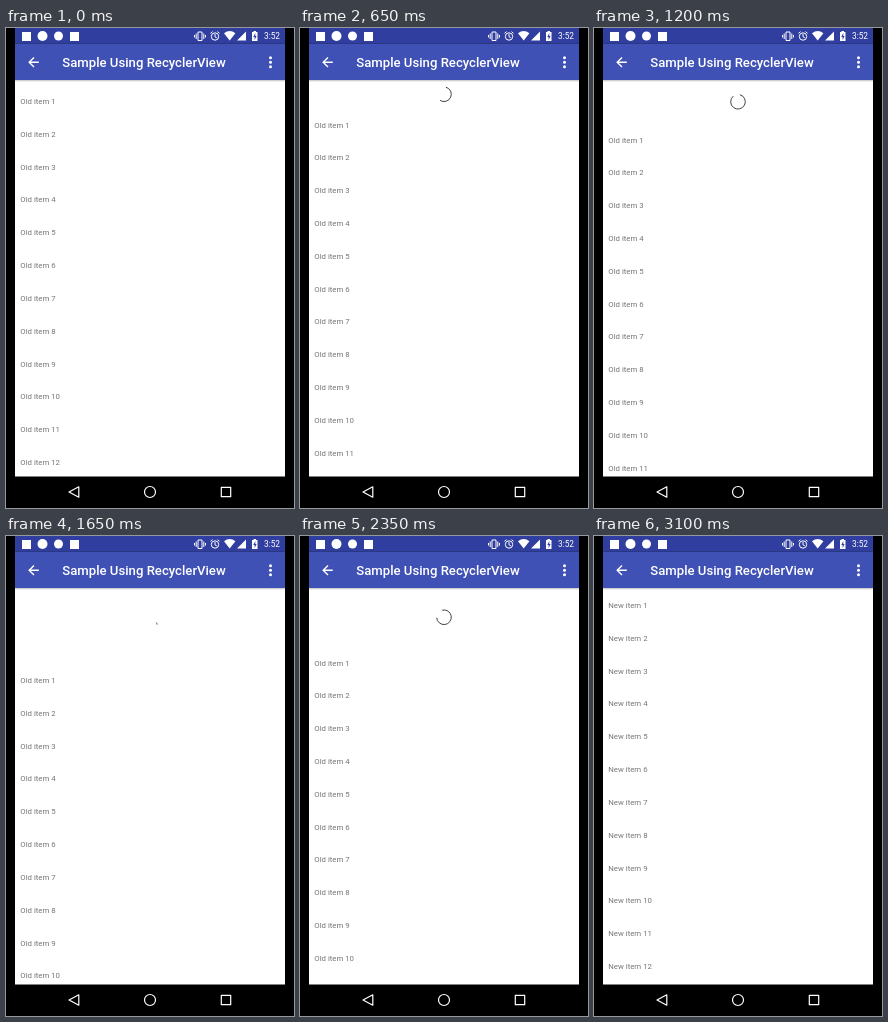
Write an HTML page that moves like this. It is 288 px wide and 480 px high and loops after 3.25 s.

```html
<!DOCTYPE html>
<html lang="en">
<head>
<meta charset="utf-8">
<title>Pull to refresh</title>
<style>
  html, body { margin: 0; width: 100%; height: 100%; overflow: hidden; background: #000; }
  svg { display: block; }
  text { font-family: Roboto, sans-serif; }
  #rows text { font-size: 7.8px; fill: #757575; }
</style>
</head>
<body>
<svg width="288" height="480" viewBox="0 0 288 480">
  <defs>
    <clipPath id="list"><path d="M9 52h270v396.5H9z"/></clipPath>
    <linearGradient id="shade" x2="0" y2="1">
      <stop stop-color="#000" stop-opacity=".25"/>
      <stop offset="1" stop-color="#000" stop-opacity="0"/>
    </linearGradient>
  </defs>

  <path fill="#fff" d="M9 52h270v396.5H9z"/>
  <g clip-path="url(#list)">
    <g id="rows"></g>
    <path id="ring" fill="none" stroke="#444" stroke-width="1"/>
  </g>

  <!-- status bar and toolbar -->
  <path fill="#303f9f" d="M9 0h270v15.5H9z"/>
  <path fill="#3f51b5" d="M9 15.5h270V52H9z"/>
  <path fill="url(#shade)" d="M9 52h270v2H9z"/>
  <g fill="#fff">
    <path d="M16 4h9v9h-9zM64 4h9v9h-9z"/>
    <circle cx="36.5" cy="8" r="5"/>
    <circle cx="52.5" cy="8" r="4.5"/>
    <path d="M218 5.2q5.7-4.4 11.4 0L223.700 12.500zM231 12.500l9-9v9z"/>
    <path d="M246 4h1.500v-1h2.500v1h1.500v9h-5.500z"/>
    <text x="258" y="11" font-size="8.300">3:52</text>
    <text x="56.300" y="39.200" font-size="13.150" font-weight="500">Sample Using RecyclerView</text>
    <circle cx="264.500" cy="29.800" r="1.500"/>
    <circle cx="264.500" cy="34.300" r="1.500"/>
    <circle cx="264.500" cy="38.800" r="1.500"/>
  </g>
  <path fill="#303f9f" d="M249.300 5l-2 4h1.300v3l2-4h-1.300z"/>
  <g fill="none" stroke="#fff">
    <path d="M192 4h4v8.500h-4zM190.200 5.500v5.500M197.800 5.500v5.500M188.500 7v2.500M199.500 7v2.500"/>
    <circle cx="209" cy="8.500" r="3.700"/>
    <path d="M209 6v2.800l1.800 1M204.500 5.300l2-1.700M213.500 5.300l-2-1.700"/>
    <path stroke-width="1.400" d="M32.800 34.300H23.500M28 29.500l-4.800 4.800 4.800 4.800"/>
    <!-- navigation bar -->
    <path stroke-width="1.200" stroke-linejoin="round" d="M72.800 458.800v10.400L63 464zM215.300 459.300h9.400v9.400h-9.400z"/>
    <circle stroke-width="1.200" cx="144" cy="464" r="5.500"/>
  </g>
</svg>
<script>
const LOOP = 3250, STEP = 50, PITCH = 32.82, HOLD = 57.5;
const RELEASE = 2180, DONE = 2800, SPIN = 1534, TURN = 888;
// [time, distance pulled]
const drag = [[0, 4], [300, 17], [550, 26], [650, 27.5], [1100, 39.5], [1200, 42.5],
  [1450, 61], [1650, 75], [1950, 92.5], [RELEASE, 95]];

const rows = document.getElementById('rows');
const ring = document.getElementById('ring');
const labels = Array.from({ length: 12 }, (_, i) => {
  const label = document.createElementNS('http://www.w3.org/2000/svg', 'text');
  label.setAttribute('x', 14.3);
  label.setAttribute('y', 72 + i * PITCH);
  return rows.appendChild(label);
});

const mix = (a, b, k) => a + (b - a) * k;
const slowDown = k => 1 - (1 - Math.min(1, k)) ** 4;

function pulled(t) {
  if (t >= DONE) return HOLD * (1 - slowDown((t - DONE) / 300));
  if (t >= RELEASE) return mix(95, HOLD, slowDown((t - RELEASE) / 200));
  const i = drag.findIndex(([time]) => time > t);
  const [t0, y0] = drag[i - 1], [t1, y1] = drag[i];
  return mix(y0, y1, (t - t0) / (t1 - t0));
}

function arc(cy, start, sweep) {
  const point = deg => {
    const a = deg * Math.PI / 180;
    return `${144 + 7.3 * Math.cos(a)} ${cy + 7.3 * Math.sin(a)}`;
  };
  return `M${point(start)}A7.3 7.3 0 ${+(sweep > 180)} 1 ${point(start + sweep)}`;
}

function draw(t) {
  const y = pulled(t);
  const word = t < DONE ? 'Old' : 'New';
  rows.setAttribute('transform', `translate(0 ${y})`);
  labels.forEach((label, i) => label.textContent = `${word} item ${i + 1}`);

  let start = 285, sweep = 330 * Math.min(1, y / 46);
  if (t >= SPIN) {
    const turn = (t - SPIN) / TURN;
    start += 360 * turn;
    sweep = 5 + 280 * (0.5 - 0.5 * Math.cos(Math.PI * turn));
  }
  ring.setAttribute('d', t < DONE ? arc(52.5 + y / 2, start, sweep) : '');
}

function frame(now) {
  draw(Math.floor(now % LOOP / STEP) * STEP);
  requestAnimationFrame(frame);
}
draw(0);
requestAnimationFrame(frame);
</script>
</body>
</html>
```
